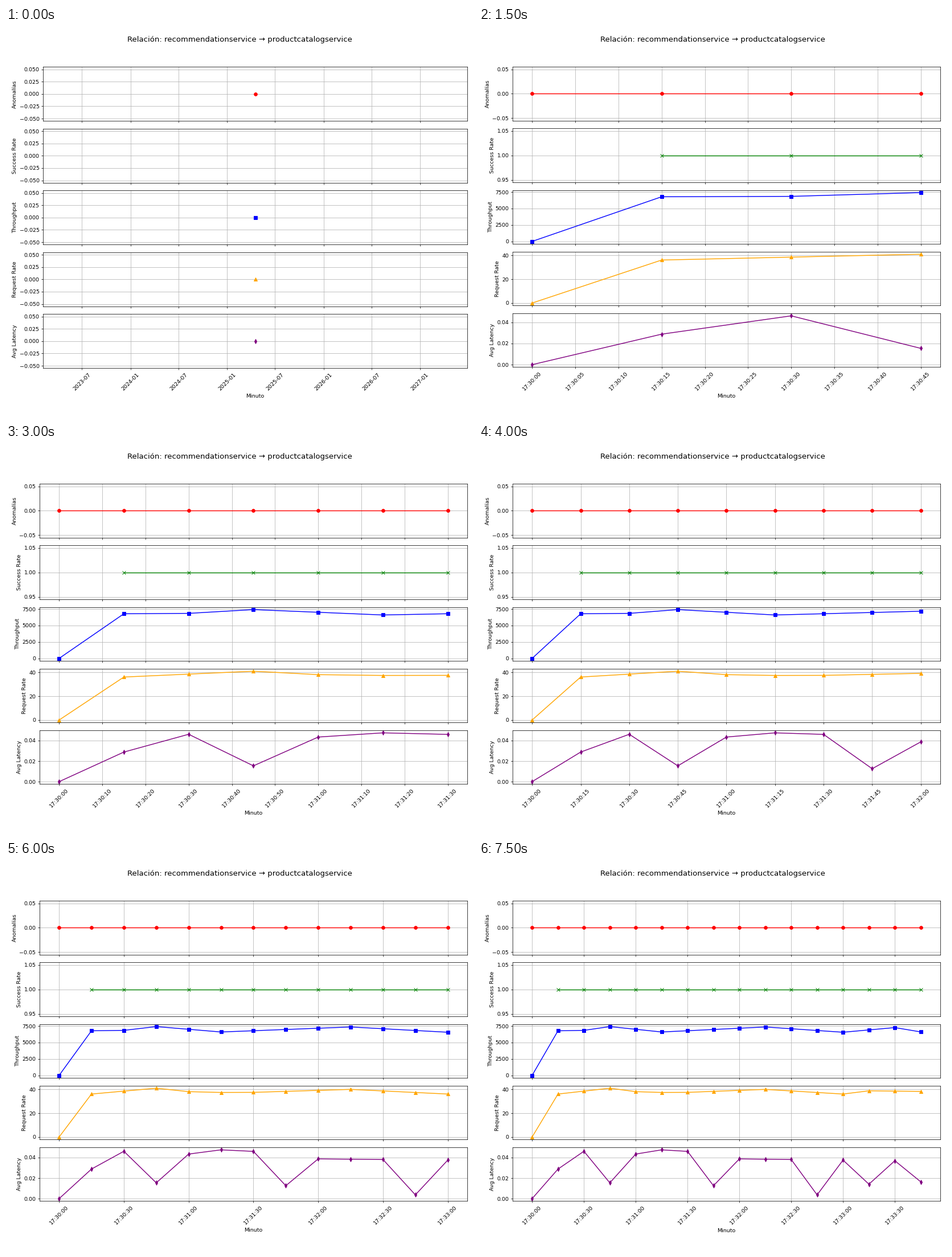
A matplotlib script that plays this animation: 820 by 683 pixels, repeating every 8000 ms.

```python
import numpy as np
import matplotlib.pyplot as plt
import matplotlib.dates as mdates
from matplotlib.animation import FuncAnimation

W, H, DPI = 820, 683, 68.3333
STEPS = 16
STEP_SECONDS = 15

plt.rcParams["font.family"] = "DejaVu Sans"

step = np.arange(STEPS)
start = mdates.date2num(np.datetime64("2025-04-16T17:30:00"))
times = start + step * STEP_SECONDS / 86400


def through(*points):
    """Sample straight segments through (step, value) key points."""
    return np.interp(step, *zip(*points))


anomalies = np.zeros(STEPS)
success = np.where(step > 0, 1.0, np.nan)
throughput = through((0, 0), (1, 6785), (2, 6845), (3, 7420), (5, 6600),
                     (9, 7360), (12, 6560), (14, 7270), (15, 6610))
requests = through((0, 0), (1, 36.2), (3, 41.1), (4, 38.2), (5.5, 37.2),
                   (9, 40.1), (12, 36.2), (13, 38.9), (15, 38.4))

# Latency follows a slowly falling level, broken by short dips.
latency = through((0, 0), (1, .0288), (2, .0461), (4, .0434), (5, .0475),
                  (6, .046), (8, .0387), (14, .0369))
latency[[3, 7, 11, 13, 15]] = .0154, .0126, .0037, .0141, .0164

# label, values, marker, colour
SERIES = [
    ("Anomalías", anomalies, "o", "red"),
    ("Success Rate", success, "x", "green"),
    ("Throughput", throughput, "s", "blue"),
    ("Request Rate", requests, "^", "orange"),
    ("Avg Latency", latency, "d", "purple"),
]

fig, axes = plt.subplots(len(SERIES), 1, sharex=True, dpi=DPI,
                         figsize=((W + 1e-3) / DPI, (H + 1e-3) / DPI))
fig.suptitle("Relación: recommendationservice → productcatalogservice",
             fontsize=14)

lines = []
for ax, (label, _, marker, color) in zip(axes, SERIES):
    lines += ax.plot([], [], marker=marker, color=color)
    ax.set_ylabel(label)
    ax.grid(True)
axes[-1].xaxis_date()
axes[-1].tick_params(axis="x", rotation=45)
axes[-1].set_xlabel("Minuto")


def place(left, bottom, gap, top=68.3, right=809.8):
    """Stack the panels; all values are pixels from the top left."""
    n = len(SERIES)
    height = (bottom - top - (n - 1) * gap) / n
    fig.subplots_adjust(left=left / W, right=right / W, top=1 - top / H,
                        bottom=1 - bottom / H, hspace=gap / height)


def update(i):
    # The margins settle over the first steps as the tick labels change.
    place(left=65.2 if i < 2 else 59.1,
          bottom=597.4 if i == 0 else 595.4,
          gap=13.5 if i < 3 else 13.9)
    for ax, line, (_, values, _, _) in zip(axes, lines, SERIES):
        line.set_data(times[:i + 1], values[:i + 1])
        ax.yaxis.get_major_locator().set_params(nbins=5 if i == 0 else 4)
        ax.relim()
    for ax in axes:
        ax.autoscale_view()
    return lines


anim = FuncAnimation(fig, update, frames=STEPS, interval=500,
                     repeat=True, repeat_delay=0, blit=False)
plt.show()
```
